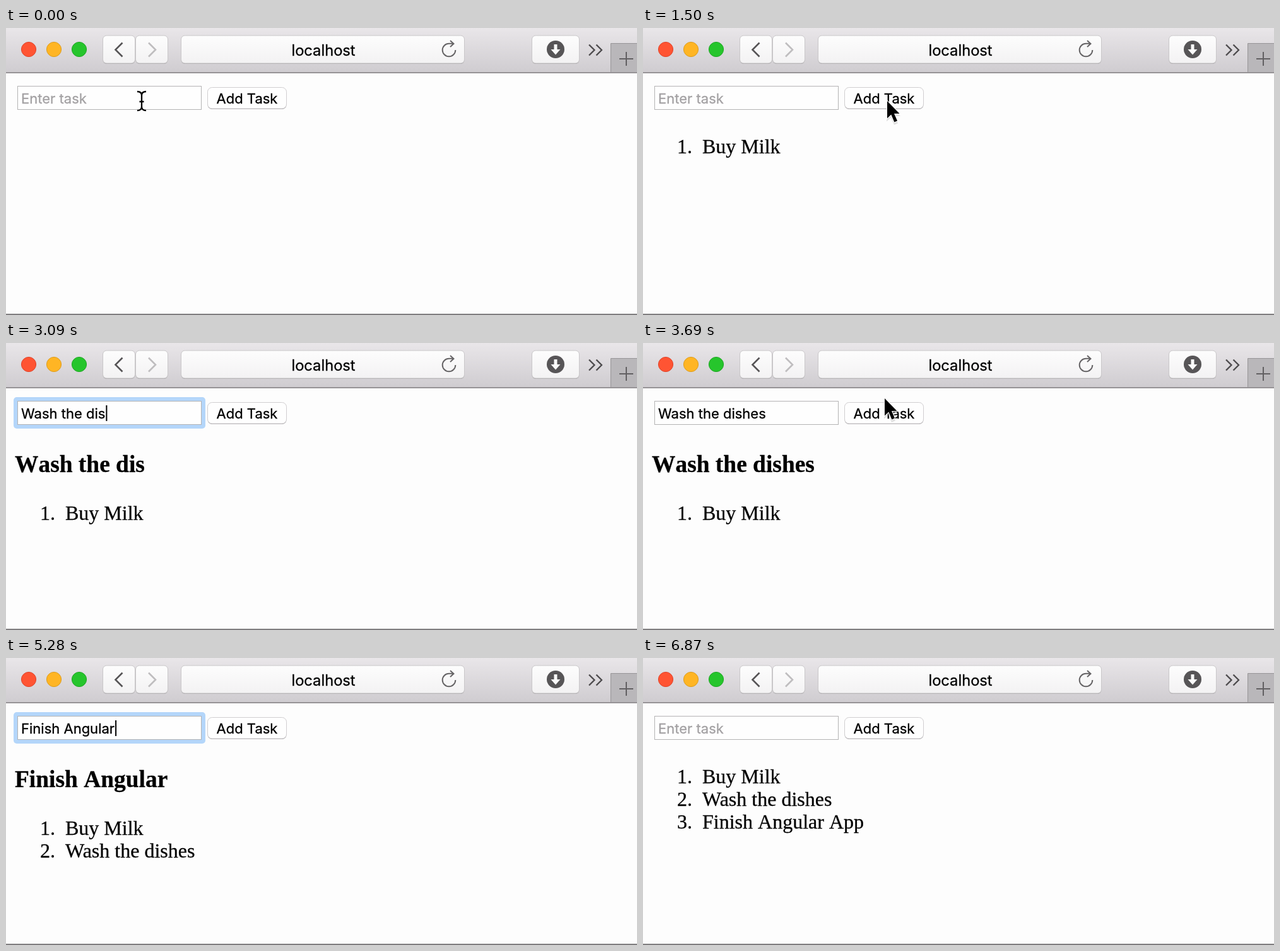
An HTML page that plays this animation: 1000 px wide and 456 px high, repeating every 6900 ms.

```html
<!DOCTYPE html>
<html lang="en">
<head>
<meta charset="utf-8">
<title>Task list</title>
<style>
html, body { margin: 0; width: 100%; height: 100%; overflow: hidden; background: #fdfdfd; }
svg { display: block; width: 100%; height: 100%; }
text { white-space: pre; fill: currentColor; stroke: currentColor; stroke-width: .3; color: #000; }
.ui { font: 22px Inter, Roboto, sans-serif; }
.page { font: 32px "Liberation Serif", serif; }
.head { font: bold 37.44px "Liberation Serif", serif; font-kerning: none; }
.gap { font-kerning: none; }
.line { fill: none; stroke-width: 2.6; }
</style>
</head>
<body>
<svg viewBox="0 0 1000 456">
  <defs>
    <linearGradient id="bar" x2="0" y2="1">
      <stop offset="0" stop-color="#e9e6e9"/>
      <stop offset="1" stop-color="#cfccd0"/>
    </linearGradient>
    <linearGradient id="btn" x2="0" y2="1">
      <stop offset="0" stop-color="#fdfdfd"/>
      <stop offset="1" stop-color="#f3f2f3"/>
    </linearGradient>
  </defs>
  <rect width="1000" height="456" fill="#fdfdfd"/>

  <rect width="1000" height="71" fill="url(#bar)"/>
  <rect y="70" width="1000" height="2" fill="#969396"/>
  <g stroke-width="1">
    <circle cx="36" cy="34" r="11.6" fill="#ff5433" stroke="#df432a"/>
    <circle cx="76" cy="34" r="11.6" fill="#ffb524" stroke="#dd9c1c"/>
    <circle cx="116" cy="34" r="11.6" fill="#26c52c" stroke="#1fa624"/>
  </g>
  <g id="boxes"></g>
  <path class="line" d="M184.500 23.500L173.500 34.500L184.500 45.500" stroke="#565456"/>
  <path class="line" d="M226 23.500L237 34.500L226 45.500" stroke="#bfbdbf"/>
  <text class="ui" x="503" y="44" text-anchor="middle" style="font-size:23.700px">localhost</text>
  <path d="M712.300 35A10.300 10.300 0 1 1 702 24.700H709M704 20L709.500 24.900L704 30"
    fill="none" stroke="#666466" stroke-width="2"/>
  <circle cx="871" cy="34" r="14" fill="#575557"/>
  <path d="M868.500 26h5v8h5l-7.500 8.500l-7.500-8.500h5z" fill="#fbfbfb"/>
  <path class="line" d="M924 26.500l8.500 8.500l-8.500 8.500M935.500 26.500l8.500 8.500l-8.500 8.500" stroke="#4c4a4c" style="stroke-width:2.300"/>
  <path d="M958.500 70V24.500H1000V70z" fill="#b9b7ba"/>
  <path d="M958.500 70V24.500H1000" fill="none" stroke="#979597"/>
  <path d="M972 49h22M983 38v22" stroke="#626062" stroke-width="2"/>

  <rect id="ring" x="12" y="86" width="304" height="50" rx="5" fill="#b4d6fa"/>
  <rect x="18.500" y="92.500" width="291" height="37" fill="#fefefe" stroke="#b4b3b4"/>
  <text id="field" class="ui" x="24" y="120"></text>
  <rect id="caret" y="99" width="2" height="25"/>
  <rect x="319.500" y="95" width="125" height="34" rx="7" fill="#a9a7a9"/>
  <rect x="319.500" y="94.500" width="125" height="33.500" rx="7" fill="#fefefe" stroke="#d0ced0"/>
  <text class="ui" x="333.500" y="120">Add Task</text>

  <text id="title" class="head" x="14" y="205"></text>
  <g id="list" class="page"></g>
  <rect y="454" width="1000" height="2" fill="#807e80"/>

  <g id="arrow">
    <path d="M-1-2V30.500L5.800 24.500L11 36L17 33.500L12 22H21z" fill="#b5b3b5" opacity=".4" transform="translate(0 2)"/>
    <path d="M0 0V27.500L6.300 21.600L11.300 33.500L16 31.500L11 20H19.500z" stroke="#fefefe" stroke-width="2" paint-order="stroke"/>
  </g>
  <g id="beam" fill="none">
    <path d="M-7-15Q0-15 0-9Q0-15 7-15M0-10V10M-7 15Q0 15 0 9Q0 15 7 15M-3.500 1H3.500" stroke="#fefefe" stroke-width="4.500"/>
    <path d="M-7-15Q0-15 0-9Q0-15 7-15M0-10V10M-7 15Q0 15 0 9Q0 15 7 15M-3.500 1H3.500" stroke="#000" stroke-width="2.300"/>
  </g>
</svg>
<script>
const LOOP = 6900, STEP = 30;
const $ = id => document.getElementById(id);
const show = (el, on) => el.setAttribute('visibility', on ? 'visible' : 'hidden');
const setText = (el, s) => { if (el.textContent !== s) el.textContent = s; };

function add(parent, tag, attrs, text = '') {
  const el = document.createElementNS('http://www.w3.org/2000/svg', tag);
  for (const k in attrs) el.setAttribute(k, attrs[k]);
  el.textContent = text;
  parent.append(el);
  return el;
}

// Toolbar buttons: x, width
for (const [x, width] of [[153.5, 51], [205.5, 51], [277.5, 449], [833.5, 75]]) {
  add($('boxes'), 'rect', { x, y: 13, width, height: 44, rx: 6, fill: '#a5a3a5' });
  add($('boxes'), 'rect', { x, y: 12, width, height: 44, rx: 6, fill: 'url(#btn)', stroke: '#c9c7c9' });
}

// Each task: focus, blur and submit times, then typing runs [start, end, text]
const tasks = [
  { focus: 90, blur: 1290, done: 1320, runs: [[210, 840, 'Buy Milk']] },
  { focus: 2010, blur: 3630, done: 3810, runs: [[2430, 3270, 'Wash the dishes']] },
  { focus: 4050, blur: 6090, done: 6120,
    runs: [[4110, 4410, 'Finish'], [4560, 5220, ' Angular'], [5340, 5580, ' App']] }
];

// Pointer path: time, x, y
const path = [
  [0, 215, 116], [900, 215, 116], [1230, 387, 116], [1620, 387, 116], [1980, 247, 108],
  [3330, 247, 108], [3690, 383, 88], [3780, 386, 112], [3870, 386, 112], [4050, 240, 112],
  [5640, 240, 112], [5970, 387, 114], [6480, 387, 114], [6780, 1012, 240]
];
const hidden = [[210, 900], [2430, 3330], [4110, 5640], [6780, LOOP]];

const items = tasks.map((task, i) => {
  const g = add($('list'), 'g', {});
  const y = 199 + 36 * i;
  add(g, 'text', { x: 54, y }, `${i + 1}.`);
  // Spaces are separate spans so that they are not kerned with the next letter
  const label = add(g, 'text', { x: 94, y });
  for (const s of task.runs.map(r => r[2]).join('').split(/( )/))
    add(label, 'tspan', s === ' ' ? { class: 'gap' } : {}, s);
  return g;
});

function typed(task, t) {
  let text = '', last = task.focus;
  for (const [from, to, s] of task.runs) {
    if (t < from) break;
    const gap = (to - from) / (s.length - 1);
    const n = Math.min(s.length, Math.floor((t - from) / gap + 1e-6) + 1);
    text += s.slice(0, n);
    last = from + (n - 1) * gap;
  }
  return { text, last };
}

function pointer(t) {
  const i = path.findIndex(p => p[0] > t);
  if (i < 0) return path[path.length - 1].slice(1);
  const [t0, x0, y0] = path[i - 1], [t1, x1, y1] = path[i];
  const u = (t - t0) / (t1 - t0), k = u * u * (3 - 2 * u);
  return [x0 + (x1 - x0) * k, y0 + (y1 - y0) * k];
}

function draw(t) {
  const task = tasks.find(a => t < a.done);
  const { text, last } = task ? typed(task, t) : { text: '', last: 0 };
  const focused = !!task && t >= task.focus && t < task.blur;

  setText($('field'), text || 'Enter task');
  $('field').style.color = text ? '#000' : '#a3a1a3';
  setText($('title'), text);
  $('list').setAttribute('transform', `translate(0 ${text ? 82 : 0})`);
  items.forEach((g, i) => show(g, t >= tasks[i].done));

  show($('ring'), focused);
  show($('caret'), focused && (t - last) % 500 < 250);
  $('caret').setAttribute('x', 25 + (text ? $('field').getComputedTextLength() : 0));

  const [x, y] = pointer(t);
  const over = x > 18 && x < 310 && y > 92 && y < 130;
  const seen = !hidden.some(([a, b]) => t >= a && t < b);
  show($('beam'), seen && over);
  show($('arrow'), seen && !over);
  for (const id of ['beam', 'arrow']) $(id).setAttribute('transform', `translate(${x} ${y})`);
}

function tick() {
  const t = performance.now() % LOOP;
  draw(Math.floor(t / STEP) * STEP);
  requestAnimationFrame(tick);
}
tick();
</script>
</body>
</html>
```
